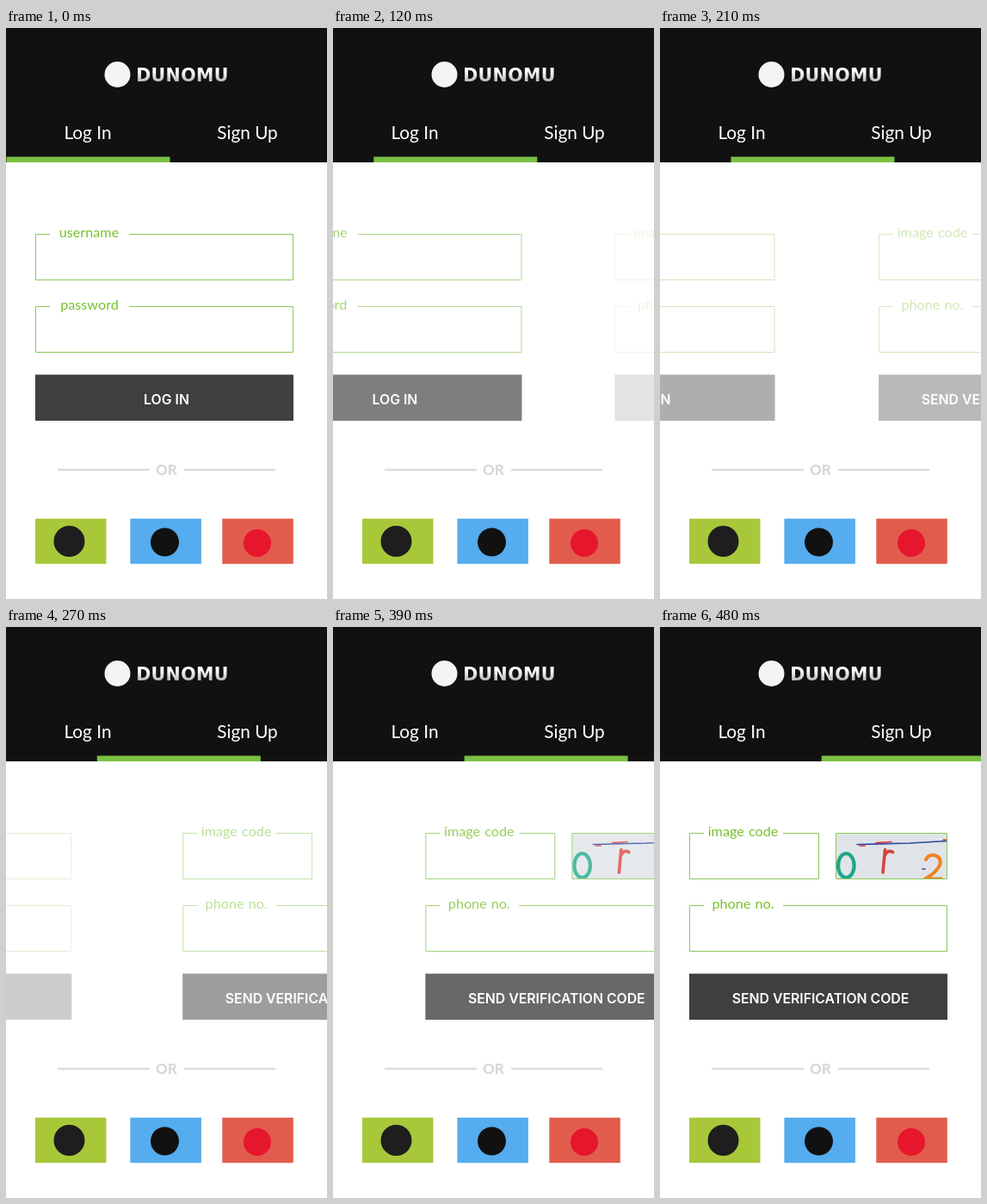
An HTML page that plays this animation: 373 px wide and 663 px high, repeating every 0.51 s.

```html
<!DOCTYPE html>
<html lang="en">
<head>
<meta charset="utf-8">
<title>Log in</title>
<style>
  html, body { margin: 0; width: 100%; height: 100%; overflow: hidden; background: #fff; }
  svg { display: block; width: 373px; height: 663px; }
  text { font: 16.2px Lato, "Open Sans", sans-serif; text-anchor: middle; }
  .tab { font-size: 20.8px; fill: #fff; }
  .label { fill: #78c02f; word-spacing: 1px; }
  .field { fill: none; stroke: #8ac75a; }
  .button { fill: #403e3f; }
  .action { font: 600 15.8px Inter, sans-serif; fill: #fff; }
  .or { font-size: 17px; font-weight: 800; fill: #d8d8d8; }
  .brand { font: bold 20.5px "DejaVu Sans", sans-serif; letter-spacing: .4px; fill: url(#metal); }
  .rule { stroke: #dcdcdc; stroke-width: 2.5; stroke-linecap: round; }
  .code { fill: none; stroke-linecap: round; stroke-linejoin: round; }
</style>
</head>
<body>
<svg viewBox="0 0 373 663">
  <defs>
    <linearGradient id="metal" x2="0" y2="1">
      <stop offset=".3" stop-color="#fff"/>
      <stop offset=".9" stop-color="#a8a8a8"/>
    </linearGradient>
    <clipPath id="captcha"><path d="M204 239H334V293H204Z"/></clipPath>
  </defs>

  <path d="M0 0H373V156H0Z" fill="#111"/>
  <circle cx="129.5" cy="54" r="15" fill="#f4f4f4"/>
  <text class="brand" x="205" y="62">DUNOMU</text>
  <text class="tab" x="95" y="129">Log In</text>
  <text class="tab" x="280.5" y="129">Sign Up</text>
  <rect id="bar" y="149.5" width="190" height="6.5" fill="#7ac143"/>

  <g id="login">
    <path class="field" d="M51 239.5H34.5V292.5H333.5V239.5H143"/>
    <path class="field" d="M51 323.5H34.5V376.5H333.5V323.5H143"/>
    <text class="label" x="96.5" y="243.3">username</text>
    <text class="label" x="97" y="327.3">password</text>
    <rect class="button" x="34" y="402.5" width="300" height="53.5"/>
    <text class="action" x="186.5" y="437">LOG IN</text>
  </g>

  <g id="signup">
    <path class="field" d="M51 239.5H34.5V292.5H184.5V239.5H143"/>
    <path class="field" d="M51 323.5H34.5V376.5H333.5V323.5H143"/>
    <text class="label" x="96.5" y="243.3">image code</text>
    <text class="label" x="96.5" y="327.3">phone no.</text>
    <g class="code" clip-path="url(#captcha)">
      <path d="M204 239H334V293H204Z" fill="#e0e4e8"/>
      <ellipse cx="216.3" cy="277" rx="9.3" ry="14" stroke="#1fa68a" stroke-width="4.2"/>
      <path d="M261.5 258.5L259 285M260.5 267Q264 257.5 270.5 261.5" stroke="#d8423e" stroke-width="3.6"/>
      <path d="M309 270Q312 264 319 265Q328 268 325 277Q320 286 308 292.5H327" stroke="#ee8423" stroke-width="4"/>
      <path d="M229 252.5L290 251L333 248.5M305 281H308" stroke="#2c48a0" stroke-width="1.6"/>
      <path d="M232 254H238M251 250.5L269 249.5M329 247H333" stroke="#d33" stroke-width="1.5"/>
    </g>
    <path class="field" d="M204.5 239.5H333.5V292.5H204.5Z"/>
    <rect class="button" x="34" y="402.5" width="300" height="53.5"/>
    <text class="action" x="186.5" y="437">SEND VERIFICATION CODE</text>
  </g>

  <path class="rule" d="M61 513H166M208 513H312"/>
  <text class="or" x="186.5" y="519">OR</text>

  <rect x="34" y="569.7" width="82.5" height="52.5" fill="#a8c83a"/>
  <circle cx="73.5" cy="596" r="18" fill="#1e1e1e"/>
  <rect x="144.4" y="569.7" width="82.5" height="52.5" fill="#55acee"/>
  <circle cx="184.5" cy="597" r="16.5" fill="#111"/>
  <rect x="251.3" y="569.7" width="82.5" height="52.5" fill="#e25c4d"/>
  <circle cx="292" cy="598" r="16" fill="#e6162d"/>
</svg>
<script>
  const LOOP = 510, STEP = 30, END = 480;
  const [bar, login, signup] = ["bar", "login", "signup"].map(id => document.getElementById(id));

  function place(form, x, opacity) {
    form.setAttribute("transform", `translate(${x})`);
    form.setAttribute("opacity", Math.min(1, Math.max(0, opacity)));
  }

  function draw(now) {
    const t = Math.floor(now % LOOP / STEP) * STEP;
    bar.setAttribute("x", 0.5 + t * 0.39);
    place(login, -t * 0.9545, 1 - t / 360);
    place(signup, (END - t) * 0.815, (t - 60) / 420);
  }

  const start = performance.now();
  function tick() {
    draw(performance.now() - start);
    requestAnimationFrame(tick);
  }
  tick();
</script>
</body>
</html>
```
